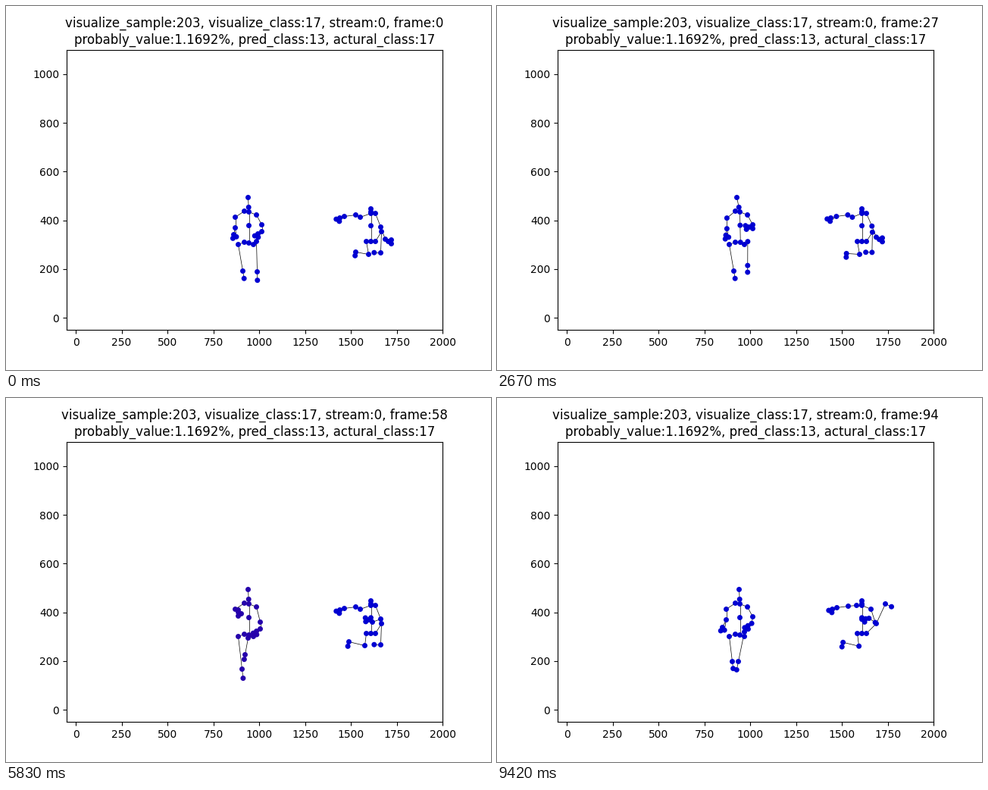
Animation, 640 px wide and 480 px high, one loop 9.51 s. Source, as a matplotlib script:

```python
import math

import matplotlib.pyplot as plt
import numpy as np
from matplotlib.animation import FuncAnimation
from matplotlib.collections import LineCollection

LOOP_MS, STEP_MS = 9510, 30
TICK_MS = 1000 / 12
LAST_TICK = 113
HEIGHT = 480

# Resting joints in stage pixels, from the root of each limb outwards.
STANDING = {
    "trunk": [(319, 252), (320, 271), (320, 312)],
    "arm1": [(314, 270), (302, 278), (302, 292), (300, 301)],
    "arm2": [(330, 275), (337, 288), (337, 297), (332, 300)],
    "leg1": [(314, 311), (306, 314), (312, 349)],
    "leg2": [(326, 314), (330, 310), (331, 350)],
}
SEATED = {
    "trunk": [(481, 267), (481, 273), (481, 310)],
    "arm1": [(467, 278), (461, 275), (446, 277), (440, 279)],
    "arm2": [(487, 273), (494, 291), (500, 307), (504, 310)],
    "leg1": [(475, 310), (478, 327), (461, 324)],
    "leg2": [(487, 310), (495, 297), (494, 325)],
}

# Joint numbers within a limb.
HEAD, BASE = 0, 2
SHOULDER, ELBOW, WRIST, HAND = range(4)
KNEE, ANKLE = 1, 2


def move(limb, joint, shift, start, end=None):
    """Shift a joint, and the ones beyond it, at a sample or over a span."""
    return limb, joint, shift, start, end or start


STANDING_MOVES = [
    # lean back and kick
    move("trunk", HEAD, (-4, 1), 37),
    move("trunk", BASE, (6, -7), 37),
    move("trunk", HEAD, (4, -1), 37),
    move("trunk", HEAD, (-3, 0), 17, 37),
    move("arm1", HAND, (5, -3), 17),
    move("arm1", ELBOW, (7, 9), 37),
    move("arm2", WRIST, (0, -4), 17, 37),
    move("arm2", HAND, (0, -5), 17, 37),
    move("leg2", ANKLE, (-11, -16), 17),
    move("leg2", KNEE, (3, 1), 37),
    move("leg2", ANKLE, (2, -51), 37),
    # land with the arms drawn in
    move("arm1", WRIST, (4, -13), 58),
    move("arm1", HAND, (2, -6), 58),
    move("arm2", ELBOW, (-2, 7), 58),
    move("leg1", ANKLE, (-1, 8), 58),
    move("leg2", KNEE, (-11, 6), 58),
    move("leg2", ANKLE, (-5, -18), 58),
    # stand with the feet together
    move("leg1", ANKLE, (-2, -2), 71, 94),
    move("leg2", KNEE, (-4, -2), 71, 94),
    move("leg2", ANKLE, (-9, -1), 71, 94),
    move("arm1", HAND, (-3, 1), 71, 94),
    move("arm2", WRIST, (-11, -2), 84),
]
SEATED_MOVES = [
    move("arm2", WRIST, (2, -5), 17),
    move("arm1", SHOULDER, (11, 0), 37),
    move("arm1", HAND, (-11, 0), 37),
    move("arm2", ELBOW, (2, -10), 37),
    move("arm2", WRIST, (-4, -6), 37),
    move("leg1", ANKLE, (-3, 15), 37),
    move("leg2", KNEE, (-1, 6), 37),
    move("leg2", ANKLE, (4, -11), 37),
    move("arm2", WRIST, (-17, -12), 58),
    move("arm2", HAND, (-9, -6), 58),
    move("leg1", KNEE, (-5, -1), 58),
    move("leg1", ANKLE, (-4, -2), 58, 94),
    move("arm1", ELBOW, (0, 4), 71),
    move("arm2", WRIST, (6, -17), 71),
    move("leg2", KNEE, (-4, -7), 71),
    move("arm2", ELBOW, (-11, -4), 84),
    move("arm2", WRIST, (6, -4), 84),
    move("arm2", HAND, (-3, 13), 84),
    move("leg1", KNEE, (-7, -2), 84),
    move("arm1", SHOULDER, (7, -5), 94),
    move("arm1", ELBOW, (-5, 4), 94),
    move("arm2", SHOULDER, (6, 5), 94),
    move("arm2", WRIST, (-15, -21), 94),
    move("arm2", HAND, (-8, -4), 94),
    move("leg2", KNEE, (5, 0), 94),
    move("leg2", ANKLE, (13, -54), 94),
]

# Foot from the shin: share along it and share across it, for each leg.
PEOPLE = [
    (STANDING, STANDING_MOVES, ((0.28, 0), (0.28, 0))),
    (SEATED, SEATED_MOVES, ((0, -0.28), (0, 0.31))),
]

ARM1, ARM2, LEG2 = slice(5, 11), slice(11, 17), slice(21, 25)
# Red bursts on the standing figure: joints, sample, strength.
BURSTS = [
    (LEG2, 17, 0.92),
    (ARM2, 17, 0.15),
    (slice(0, 25), 58, 0.18),
    (ARM1, 71, 0.25),
    (ARM2, 71, 0.18),
    (slice(13, 17), 84, 0.3),
]


def chain(*joints):
    return list(zip(joints, joints[1:]))


BONES = (
    chain(0, 1, 2, 3, 4)
    + chain(2, 5, 6, 7, 8, 9) + chain(7, 10)
    + chain(2, 11, 12, 13, 14, 15) + chain(13, 16)
    + chain(4, 17, 18, 19, 20)
    + chain(4, 21, 22, 23, 24)
)


def bell(sample, start, end, ramp):
    """Ease up to 1 at start, hold until end, ease back down."""
    gap = max(start - sample, sample - end, 0) / ramp
    return 0.5 + 0.5 * math.cos(math.pi * min(gap, 1))


def across(v):
    return np.array([-v[1], v[0]])


def with_trunk_joints(trunk):
    head, centre, base = trunk
    neck = head + 0.68 * (centre - head)
    middle = centre + 0.44 * (base - centre)
    return [head, neck, centre, middle, base]


def with_fingers(arm):
    wrist, hand = arm[WRIST], arm[HAND]
    aim = (hand - wrist) / max(np.hypot(*(hand - wrist)), 1)
    return [*arm, hand + 5 * aim, hand + 2 * aim - 4 * across(aim)]


def with_foot(leg, along, aside):
    shin = leg[ANKLE] - leg[KNEE]
    return [*leg, leg[ANKLE] + along * shin + aside * across(shin)]


def joints_at(person, sample):
    rest, moves, feet = person
    limbs = {name: np.array(pts, float) for name, pts in rest.items()}
    for limb, joint, shift, start, end in moves:
        offset = bell(sample, start, end, 13) * np.array(shift)
        last = joint + 1 if limb == "trunk" else None
        limbs[limb][joint:last] += offset
    pts = np.array(
        with_trunk_joints(limbs["trunk"])
        + with_fingers(limbs["arm1"]) + with_fingers(limbs["arm2"])
        + with_foot(limbs["leg1"], *feet[0])
        + with_foot(limbs["leg2"], *feet[1])
    ) + 0.5
    pts[:, 1] = HEIGHT - pts[:, 1]
    return to_data.transform(pts)


def colours_at(sample):
    heat = np.zeros(50)
    for part, peak, strength in BURSTS:
        burst = strength * bell(sample, peak, peak, 8)
        heat[part] = np.maximum(heat[part], burst)
    return np.column_stack([0.8 * heat, 0 * heat, 0.82 * (1 - heat)])


def sample_at(step):
    """Samples run at 10 per second, shown on a 12 per second clock."""
    tick = min(int((step * STEP_MS + 24) / TICK_MS), LAST_TICK)
    return math.ceil(tick * 5 / 6 - 0.5 - 1e-9)


fig, ax = plt.subplots(figsize=(6.4, 4.8), dpi=100)
ax.set_xlim(-50, 2000)
ax.set_ylim(-50, 1100)
to_data = ax.transData.inverted()

title = ax.set_title("")
lines = LineCollection([], colors="black", linewidths=0.5, zorder=2)
ax.add_collection(lines, autolim=False)
dots = ax.scatter(np.zeros(50), np.zeros(50), s=25, linewidths=0, zorder=3)


def update(step):
    sample = sample_at(step)
    poses = [joints_at(person, sample) for person in PEOPLE]
    lines.set_segments([pose[[a, b]] for pose in poses for a, b in BONES])
    dots.set_offsets(np.vstack(poses))
    dots.set_facecolors(colours_at(sample))
    title.set_text(
        f"visualize_sample:203, visualize_class:17, stream:0, frame:{sample}\n"
        "probably_value:1.1692%, pred_class:13, actural_class:17"
    )
    return lines, dots, title


anim = FuncAnimation(
    fig, update, init_func=lambda: update(0), frames=LOOP_MS // STEP_MS,
    interval=STEP_MS, repeat=True, repeat_delay=0,
)
plt.show()
```
